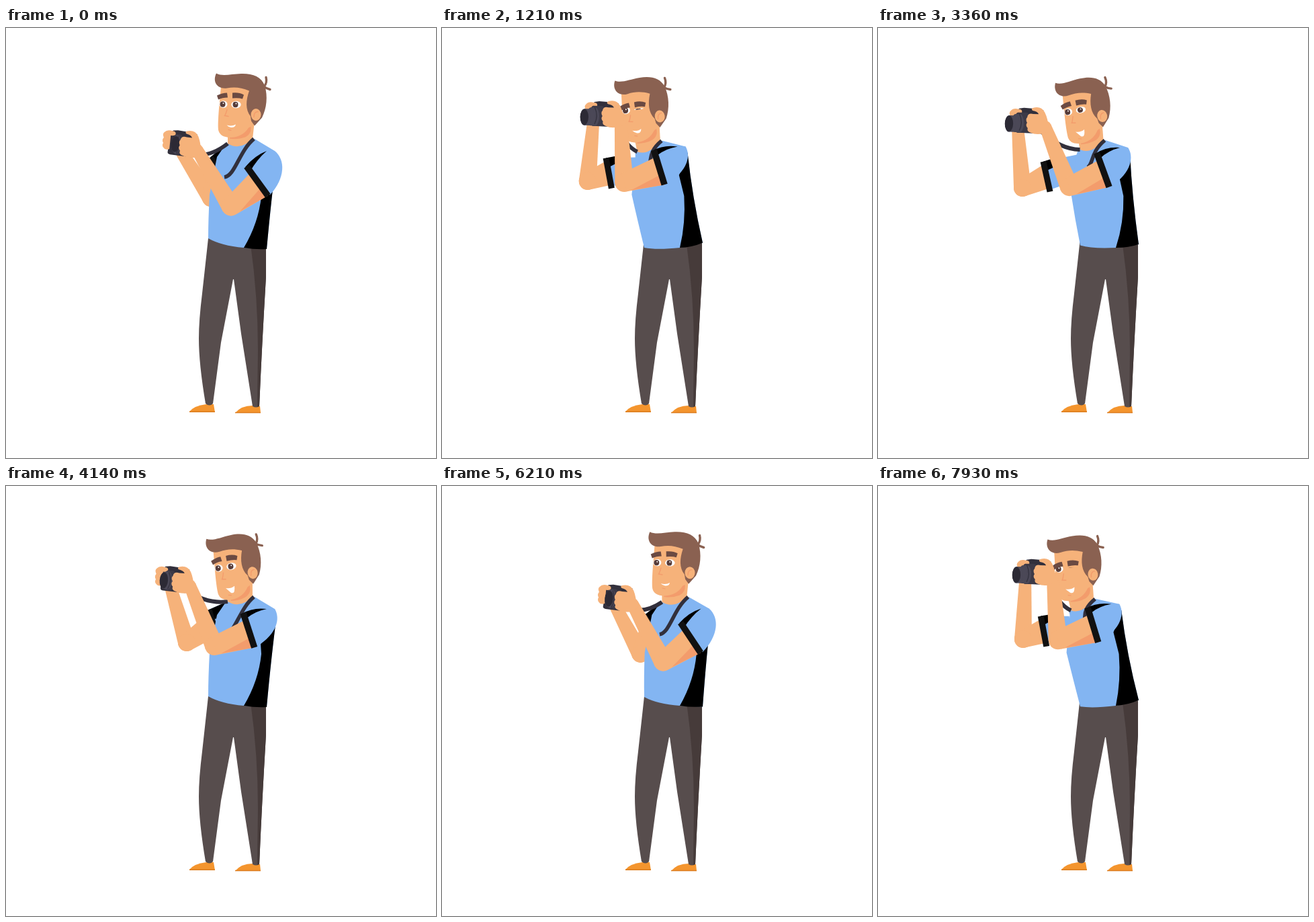
These frames come from a looping animation (640x640 px, 8000 ms). An HTML page with a canvas:

```html
<!DOCTYPE html>
<html lang="en">
<head>
<meta charset="utf-8">
<title>Photographer</title>
<style>
html, body { margin: 0; width: 100%; height: 100%; overflow: hidden; background: #fff; }
canvas { display: block; width: 100vmin; height: 100vmin; }
</style>
</head>
<body>
<canvas id="stage" width="640" height="640"></canvas>
<script>
const ctx = document.getElementById('stage').getContext('2d');
const SKIN = '#f6b27a', SHADE = '#f39c6c', SHIRT = '#83b5f2', HAIR = '#8a6151',
      BROW = '#6b4a42', CAMERA = '#32303c', LENS = '#4b4857', BLACK = '#000', CUFF = '#111';
const CUT = 8000, CYCLE = 6000;

// Key poses; tempo tells how early the move into a pose happens.
const low = { at: 0, tempo: 1.4, lean: 0, headTilt: 0, smile: .1, squint: 0,
  camX: 263, camY: 173, lens: 11, backX: 305, backY: 253, cuffTilt: 36 };
const aim = { at: 1930, tempo: 5, lean: 1.02, headTilt: -8.5, smile: .7, squint: 1,
  camX: 237, camY: 129, lens: 31, backX: 216, backY: 228, cuffTilt: 17 };
const peek = { ...aim, at: 2430, tempo: 2, lean: 1.05, headTilt: -16, smile: 1, squint: .3,
  camY: 139, backX: 219, backY: 238, cuffTilt: 23 };
const reach = { ...peek, at: 3350, lean: .7, headTilt: -11, camX: 226, backX: 215, cuffTilt: 20 };
const frame = { ...reach, at: 4140, lean: 0, headTilt: -10, squint: .1,
  camX: 252, camY: 140, lens: 17, backX: 269, backY: 233, cuffTilt: 18 };
const POSES = [low, aim, peek, reach, frame, { ...low, at: CYCLE }];

// Arms lead the body, the smile trails behind.
const PACE = { lean: 1, headTilt: 1, squint: 1, camX: .6, smile: .2,
  camY: 2.2, lens: 2.2, backX: 1.9, backY: 2.2, cuffTilt: 2.2 };

function poseAt(t) {
  const next = POSES.findIndex(pose => pose.at > t), a = POSES[next - 1], b = POSES[next];
  const s = (t - a.at) / (b.at - a.at), p = {};
  for (const key in PACE) {
    const eased = 1 - (1 - s * s) ** (b.tempo * PACE[key]);
    p[key] = a[key] + (b[key] - a[key]) * eased;
  }
  return p;
}

const rad = deg => deg * Math.PI / 180;
const add = (p, x, y) => [p[0] + x, p[1] + y];
const mix = (a, b, k) => [a[0] + (b[0] - a[0]) * k, a[1] + (b[1] - a[1]) * k];
const turn = (x, y, a) => [x * Math.cos(a) - y * Math.sin(a), x * Math.sin(a) + y * Math.cos(a)];
function unit(a, b) {
  const x = b[0] - a[0], y = b[1] - a[1], d = Math.hypot(x, y) || 1;
  return [x / d, y / d];
}
// Builds a path from text with points in it.
const path = (parts, ...points) => new Path2D(parts.reduce((s, part, i) => s + points[i - 1] + part));

function fill(shape, color) {
  ctx.fillStyle = color;
  ctx.fill(typeof shape === 'string' ? new Path2D(shape) : shape);
}
function line(shape, color, width, cap = 'butt') {
  ctx.strokeStyle = color;
  ctx.lineWidth = width;
  ctx.lineCap = cap;
  ctx.stroke(typeof shape === 'string' ? new Path2D(shape) : shape);
}
function oval(x, y, rx, ry, color) {
  ctx.beginPath();
  ctx.ellipse(x, y, rx, ry, 0, 0, 7);
  ctx.fillStyle = color;
  ctx.fill();
}
function limb(a, ra, b, rb, color) {
  const [ux, uy] = unit(a, b);
  fill(path`M${add(a, uy * ra, -ux * ra)}L${add(b, uy * rb, -ux * rb)}L${add(b, -uy * rb, ux * rb)}L${add(a, -uy * ra, ux * ra)}Z`, color);
  oval(...a, ra, ra, color);
}

// Joints that follow from the pose.
function joints(p) {
  const L = p.lean, d = p.cuffTilt - 18, a = rad(p.cuffTilt);
  const shoulder = [400 - 40 * L, 183 - 7 * L];
  const cuffTop = add(shoulder, -47 + .28 * d, 6 + .94 * d);
  return {
    shoulder, cuffTop,
    cuffBottom: add(cuffTop, Math.sin(a) * 54, Math.cos(a) * 54),
    elbow: add(cuffTop, -43 + 1.1 * d, 49 + .6 * d),
    wrist: [p.camX + 20 + p.lens * .1, p.camY + 8],
    backElbow: [p.backX, p.backY],
    backWrist: [p.camX + 7 - p.lens * .8, p.camY + 12],
    collarLeft: [327 - 42 * L, 173 + 13 * L],
    collarRight: [370 - 45 * L, 165 + 3 * L],
    ear: [373 - 47 * L + p.headTilt / 2, 128.5 + 2.5 * L]
  };
}

function drawLegs() {
  fill('M273 571Q280 562 298 560L309 560L311 572H273Z', '#f4952e');
  fill('M341 573Q350 562 367 562L378 563L379 573Z', '#f4952e');
  line('M273 571H311M341 572.5H379', '#dc7d20', 1.3);
  fill('M301 313Q297 350 292 395Q287 435 287 462Q287 500 297 559Q303 564 308 559L320 468L338 374L339 374L350 455L367 563Q372 566 377 563Q381 470 387 370L387 320Z', '#574d4d');
  fill('M364 322Q375 400 375 480L374 564L377 563Q381 470 387 370L387 319Z', '#463b3a');
}

function drawBackArm(L, { backElbow, backWrist, collarLeft }) {
  const shoulder = [322 - 36 * L, 197 + 4 * L];
  const cuff = mix(backElbow, shoulder, .44 + Math.max(0, .62 - L) * .5);
  const [ux, uy] = unit(backElbow, shoulder), tilt = -Math.atan2(uy, ux) / 2;
  const half = [Math.sin(tilt) * 23, Math.cos(tilt) * 23];
  const top = add(cuff, -half[0], -half[1]), bottom = add(cuff, ...half);
  limb(backElbow, 13, backWrist, 9, SKIN);
  limb(backElbow, 13, cuff, 18, SKIN);
  fill(path`M${top}L${mix(collarLeft, shoulder, .5 * L)}L${shoulder}L${add(shoulder, 5, 25)}L${add(bottom, 0, -3)}Z`, SHIRT);
  fill(path`M${top}L${mix(collarLeft, top, .6 * L)}L${mix(shoulder, top, .5 * L)}L${mix(top, bottom, .32)}Z`, BLACK);
  line(path`M${top}L${bottom}`, CUFF, 9);
}

function drawTorso(L, { collarLeft, collarRight, shoulder }) {
  const waistLeft = [301, 313 + 15 * L], waistRight = [388, 329 - 10 * L];
  const armpit = add(shoulder, 3, 9), side = [395 - 24 * L, 252];
  fill(path`M${collarLeft}L${collarRight}L${shoulder}L${armpit}Q${side} ${waistRight}L354 327Q${[320, 324 + 7 * L]} ${waistLeft}Q${[301 - 11 * L, 285]} ${[303 - 22 * L, 248]}L${[314 - 28 * L, 192]}Z`, SHIRT);
  fill(path`M354 327Q${[376 - 14 * L, 290]} ${[380 - 21 * L, 250]}L${[379 - 28 * L, 235 - 17 * L]}L${armpit}Q${side} ${waistRight}Q${[372, 330 - 4 * L]} 354 327Z`, BLACK);
}

function drawNeck(p, { ear, collarLeft, collarRight }) {
  const a = rad(p.headTilt), dip = add(mix(collarLeft, collarRight, .5), 0, 14);
  fill(path`M${add(collarLeft, 3, -1)}Q${dip} ${add(collarRight, -3, 0)}L${add(ear, ...turn(-3, 10, a))}L${add(ear, ...turn(-43, 28, a))}Z`, SKIN);
}

function drawEye(x, y, rx, open) {
  ctx.save();
  ctx.translate(x, y);
  ctx.scale(1, Math.max(open, .01));
  oval(0, 0, rx, 5.2, '#fff');
  oval(-1, 0, 4, 4.2, '#573c39');
  oval(0, -1.4, 1, 1, '#fff');
  ctx.restore();
}

function drawHead(p, ear) {
  ctx.save();
  ctx.translate(...ear);
  ctx.rotate(rad(p.headTilt));
  ctx.translate(-373, -129);
  fill('M333 162L364 145Q367 157 356 163Q345 167 333 165Z', SHADE);
  fill('M320 87L317 120Q315 145 316 152Q318 163 334 163.5Q352 163 361 149L371 144L375 132L368 88Z', SKIN);
  fill('M313 68C322 73 335 69 350 68.5C367 68 380 73 385 86C390 102 388 120 381 134L370 146L365 139L364 132C356 122 357 108 362 94C350 89 340 88 329 90C314 92 307 80 313 68Z', HAIR);
  line('M384 88Q389 82 387 74M383 87Q388 91 393 92', HAIR, 3.4, 'round');
  oval(372, 129.5, 7.5, 9, SKIN);
  line('M375 125Q369 125 369 133', SHADE, 1.4, 'round');
  drawEye(323.5, 114, 6, 1);
  drawEye(342.5, 114.5, 7.2, 1 - p.squint ** 2);
  ctx.save();
  ctx.translate(0, 7 * p.squint);
  fill('M314 101Q322 97 329 97L330 104Q322 104 316 107Z', BROW);
  fill('M337 97Q347 96 354 100L352 106Q346 104 337 105Z', BROW);
  ctx.restore();
  line('M329 122Q327 129 325.5 131L331 132', SHADE, 1.4, 'round');
  const open = p.smile * 9;
  fill(path`M328.5 145Q336 147.5 342 144Q${[341, 148 + open]} ${[335, 148 + open * .55]}Q331 148 328.5 145Z`, '#fff');
  line(path`M${[331, 151.5 + open * .5]}L${[335, 152.5 + open * .5]}`, SHADE, 1.2, 'round');
  ctx.restore();
}

function drawStraps(p, { collarLeft, collarRight }) {
  const L = p.lean, end = [p.camX + 17, p.camY + 15], c = add(collarRight, -1, 0);
  line(path`M${add(collarLeft, 3, -1)}Q${add(mix(collarLeft, end, .5), 0, 12)} ${end}`, CAMERA, 6);
  line(path`M${c}C${add(c, -22, 18)} ${add(c, -28 + 16 * L, 55 - 26 * L)} ${add(c, -44 + 26 * L, 57 - 24 * L)}`, CAMERA, 5.5);
}

function barrel(x0, x1, y, ry, color) {
  oval(x0, y, 6, ry, color);
  ctx.fillRect(x1, y - ry, x0 - x1, 2 * ry);
  oval(x1, y, 6, ry, color);
}

function inCamera(p, draw) {
  ctx.save();
  ctx.translate(p.camX, p.camY);
  ctx.rotate(rad(6 - (p.lens - 11) * .25));
  draw();
  ctx.restore();
}

function drawCamera(p) {
  fill('M-16 -19L-9 -20L6 -19L20 -17L16 18L-17 17Q-22 17 -21 12L-20 -15Z', CAMERA);
  fill('M-29 -15Q-25 -20 -17 -18Q-11 -18 -12 -13Q-13 -11 -19 -11L-19 9Q-25 12 -28 8Q-31 5 -29 1Q-32 -3 -29 -7Q-32 -12 -29 -15Z', SKIN);
  const front = -p.lens, out = (p.lens - 11) / 21;
  barrel(-5, -9 - 9 * out, 1 + out, 15, '#3d3a47');
  barrel(-9 - 6 * out, -10 - 12 * out, 1 + 2 * out, 13.5, LENS);
  barrel(-10 - 12 * out, front, 1 + 3 * out, 12.3, LENS);
  line(path`M${[-8 - 8 * out, -11]}Q${[-2 - 8 * out, 2]} ${[-8 - 8 * out, 14]}`, CAMERA, 1.2);
  oval(front, 1 + 3 * out, 6.2, 11.8, '#2c2a35');
}

function drawFrontHand() {
  fill('M4 -20Q16 -24 22 -14Q27 -4 28 8L20 18Q8 20 2 17Q-5 15 -3 10Q-7 6 -4 2Q-7 -3 -4 -6Q-3 -13 5 -11L13 -11Q11 -15 4 -16Q1 -18 4 -20Z', SKIN);
}

function drawFrontArm(p, { elbow, wrist, shoulder, cuffTop, cuffBottom }) {
  const [ux, uy] = unit(elbow, mix(cuffTop, cuffBottom, .6));
  const under = add(elbow, -uy * 14, ux * 14);
  limb(elbow, 14, wrist, 9, SKIN);
  oval(...wrist, 9, 9, SKIN);
  fill(path`M${add(elbow, uy * 14, -ux * 14)}L${mix(cuffTop, cuffBottom, .2)}L${cuffBottom}L${under}Z`, SKIN);
  fill(path`M${add(under, ux * 6, uy * 6)}L${mix(cuffTop, cuffBottom, .7)}L${cuffBottom}Z`, SHADE);

  const bulge = (p.cuffTilt - 18) / 18, fold = add(shoulder, -12, 0);
  const mid = mix(cuffTop, fold, .45);
  fill(path`M${cuffTop}L${fold}L${shoulder}C${add(shoulder, 8 + 8 * bulge, 13)} ${add(shoulder, 5 + 11 * bulge, 36 + 4 * bulge)} ${add(cuffBottom, 3, -1)}Z`, SHIRT);
  fill(path`M${add(cuffTop, -2, 1)}Q${add(mix(cuffTop, fold, .45), -1, -6)} ${fold}Q${add(mid, 2, 0)} ${add(cuffTop, 5, 8)}Z`, BLACK);
  line(path`M${cuffTop}L${cuffBottom}`, CUFF, 9.5);
}

function draw(t) {
  const p = poseAt(t), j = joints(p);
  ctx.clearRect(0, 0, 640, 640);
  drawLegs();
  drawBackArm(p.lean, j);
  drawTorso(p.lean, j);
  drawNeck(p, j);
  drawStraps(p, j);
  drawHead(p, j.ear);
  inCamera(p, () => drawCamera(p));
  drawFrontArm(p, j);
  inCamera(p, drawFrontHand);
}

function tick() {
  draw(performance.now() % CUT % CYCLE);
  requestAnimationFrame(tick);
}
tick();
</script>
</body>
</html>
```
